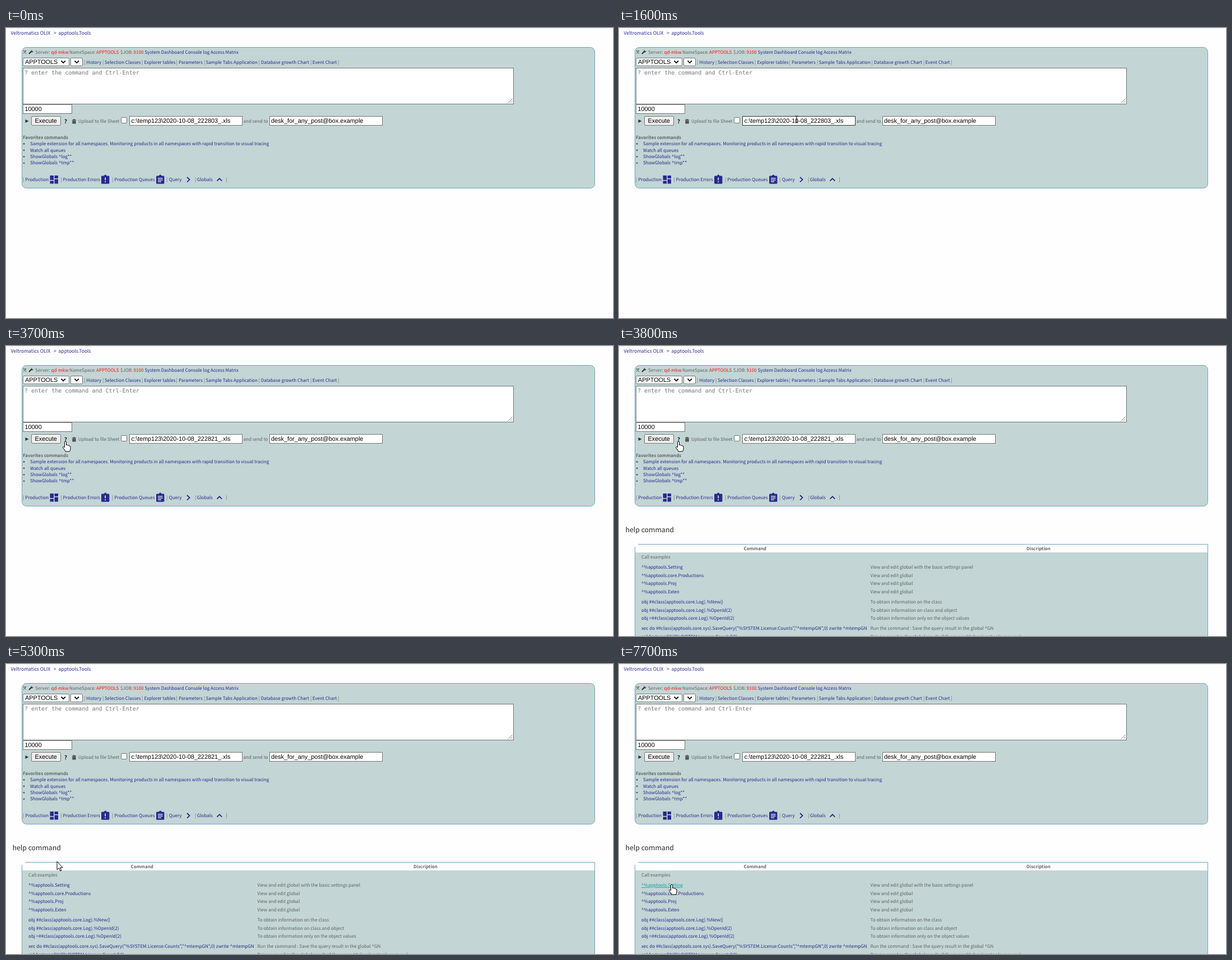
These frames come from a looping animation (1083x517 px, 8000 ms). An HTML page:

```html
<!DOCTYPE html>
<html lang="en">
<head>
<meta charset="utf-8">
<title>apptools.Tools</title>
<style>
html, body { margin: 0; height: 100%; overflow: hidden; background: #fefefe; }
svg { display: block; width: 1083px; height: 517px; }
text {
  font: 8.05px "Noto Sans CJK SC", "Noto Sans CJK JP", "Noto Sans CJK", "Open Sans", sans-serif;
  text-rendering: geometricPrecision; white-space: pre; fill: #606464;
}
.link { fill: #29298f; }
.red { fill: #f31414; }
.bold { font-size: 7.95px; font-weight: 700; }
.mid { text-anchor: middle; }
.crumb { font-size: 8.59px; fill: #29298f; }
.title { font-size: 12.3px; fill: #2a2a2a; }
.field { font: 10.87px "Liberation Sans", Arial, sans-serif; fill: #000; }
.mono { font: 10px "DejaVu Sans Mono", monospace; fill: #757575; }
.help { font-size: 9.6px; font-weight: 700; fill: #111; }
.panel { fill: #c3d5d4; stroke: #6ba5c4; }
.box { fill: #fff; stroke: #767676; }
.icon { fill: #29298f; }
.chevron { fill: none; stroke-width: 1.8; }
.hover { fill: #0f9f9f; text-decoration: underline; }
.box.over { stroke: #333; }
#pointer path { fill: #fff; stroke: #000; stroke-linejoin: round; }
</style>
</head>
<body>
<svg id="stage" viewBox="0 0 1083 517"></svg>
<script>
const escape = s => s.replace(/&/g, '&amp;').replace(/</g, '&lt;').replace(/>/g, '&gt;');
const text = (x, y, s, cls = '', id = '') =>
  `<text x="${x}" y="${y}" class="${cls}" id="${id}">${escape(s)}</text>`;
const box = (x, y, w, h, id = '', rx = 1.5) =>
  `<rect x="${x + .5}" y="${y + .5}" width="${w}" height="${h}" rx="${rx}" class="box" id="${id}"/>`;
const path = (d, cls = '', extra = '') => `<path d="${d}" class="${cls}" ${extra}/>`;
const row = (y, cls, items) => items.map(([x, s, c = cls]) => text(x, y, s, c)).join('');
const bars = (y, xs) => xs.map(x => text(x, y, '|')).join('');
const chevron = (d, color = '#111') => path(d, 'chevron', `stroke="${color}"`);

const header = text(8.5, 12, 'Veltromatics OLIX', 'crumb') + text(85, 12, '>', 'crumb') +
  text(93.5, 12, 'apptools.Tools', 'crumb') +
  path('M0 .5H1083', '', 'stroke="#f1f1f4"');

const toolbar =
  path('M31 40l5 6M36 40l-5 6M31 42l2-2M34 40l2 2', '', 'stroke="#555" fill="none"') +
  path('M41 46l4-4', '', 'stroke="#222" stroke-width="1.8"') +
  path('M47 39.5l-1.5 1.5 1 1 1.8-1.3q.3 2.8-2.5 2.5-2.2-.3-1.4-2.4.8-1.6 2.6-1.3', '', 'fill="#222"') +
  row(46, 'link', [[52, 'Server:', ''], [80.5, 'qd-mkw', 'red'], [113, 'NameSpace:', ''],
    [161, 'APPTOOLS', 'red'], [204, '$JOB:', ''], [227.5, '9100', 'red'],
    [247.5, 'System Dashboard'], [319.5, 'Console log'], [365, 'Access Matrix']]) +
  box(30, 53, 82, 14) + text(34, 64, 'APPTOOLS', 'field') + chevron('M98.5 58.5l3.7 3.7 3.7-3.7') +
  box(115, 53, 21, 14) + chevron('M122.5 58.5l3.7 3.7 3.7-3.7') +
  bars(64, [139, 172, 242, 303.5, 353, 450.5, 543, 592]) +
  row(64, 'link', [[143.2, 'History'], [176, 'Selection Classes'], [246.5, 'Explorer tables'],
    [308, 'Parameters'], [356.5, 'Sample Tabs Application'], [454.7, 'Database growth Chart'],
    [546.7, 'Event Chart']]);

const form =
  box(30, 71, 875, 64, 'command', 0) + text(33, 83, '? enter the command and Ctrl-Enter', 'mono') +
  path('M896 133.5l7.5-7.5M900 133.5l3.5-3.5', '', 'stroke="#777"') +
  box(30, 136, 87, 16, '', 0) + text(33.5, 148, '10000', 'field') +
  path('M34.5 163l6 3-6 3z', '', 'fill="#333"') +
  box(45, 157, 52, 16).replace('class', 'style="fill:#efefef" class') + text(51.5, 169, 'Execute', 'field') +
  text(104, 170, '?', 'help') +
  path('M117.8 164h7.4M120 163h3', '', 'stroke="#222"') +
  path('M118.5 165.3h6v5.2h-6z', '', 'fill="#333"') + path('M120.5 166v4M122.5 166v4', '', 'stroke="#aaa" stroke-width=".6"') +
  text(129, 169, 'Upload to file Sheet') + box(205, 159, 10, 10) +
  box(220, 157, 201, 16, 'file', 0) + text(223.5, 169, '', 'field', 'fileName') +
  text(423.5, 169, 'and send to') +
  box(470, 157, 201, 16, '', 0) + text(473, 169, 'desk_for_any_post@box.example', 'field');

const favorites = text(30, 198, 'Favorites commands', 'bold') +
  ['Sample extension for all namespaces. Monitoring products in all namespaces with rapid transition to visual tracing',
    'Watch all queues', 'ShowGlobals ^log**', 'ShowGlobals ^tmp**'].map((s, i) => {
    const y = 209.2 + i * 11.43;
    return `<circle cx="32" cy="${y - 2.7}" r="1.4" fill="#555"/>` + text(43, y, s, 'link');
  }).join('');

const links = bars(273, [30, 97.5, 189, 286, 337, 392.5]) +
  text(34.3, 273, 'Production', 'link', 'production') +
  row(273, 'link', [[101.5, 'Production Errors'], [193.3, 'Production Queues'],
    [290.7, 'Query'], [340.7, 'Globals']]) +
  path('M78.5 263h6.5v8h-6.5zM78.5 272.5h6.5v5h-6.5zM86.5 263h6.5v5h-6.5zM86.5 269.5h6.5v8h-6.5z', 'icon') +
  [177.2, 275.2].map(x => `<rect x="${x - 7.2}" y="263.5" width="14.4" height="14.3" rx="1.5" class="icon"/>
    <circle cx="${x}" cy="263.5" r="2" class="icon"/>`).join('') +
  path('M177.2 266.5v5M177.2 273.3v2', '', 'stroke="#dbe6e6" stroke-width="1.7"') +
  path('M271 268h8.5M271 271h8.5M271 274h6', '', 'stroke="#dbe6e6" stroke-width="1.4"') +
  chevron('M323 266l4.5 4.3-4.5 4.3', '#29298f') + chevron('M376.5 272.7l4.4-4.4 4.4 4.4', '#29298f');

const examples = [
  [379, 'Call examples', ''],
  [397, '^%apptools.Setting', 'View and edit global with the basic settings panel'],
  [411.6, '^%apptools.core.Productions', 'View and edit global'],
  [426.4, '^%apptools.Proj', 'View and edit global'],
  [441.2, '^%apptools.Exten', 'View and edit global'],
  [459, 'obj ##class(apptools.core.Log).%New()', 'To obtain information on the class'],
  [473.7, 'obj ##class(apptools.core.Log).%OpenId(2)', 'To obtain information on class and object'],
  [488.4, 'obj =##class(apptools.core.Log).%OpenId(2)', 'To obtain information only on the object values'],
  [506.3, 'xec do ##class(apptools.core.sys).SaveQuery("%SYSTEM.License:Counts","^mtempGN",0) zwrite ^mtempGN',
    'Run the command : Save the query result in the global ^GN'],
  [521, 'sql ^mtempGN("%SYSTEM.License:Counts",0)',
    'Bring a saved in the global result of the query ##class(apptools.core.sys)']];

const help = `<g id="help">` + text(11.5, 332, 'help command', 'title') +
  `<rect x="28.5" y="368" width="1022" height="160" fill="#c3d5d4"/>` +
  path('M28.5 517V358M34 353.5H1050.5V517', '', 'stroke="#6ba5c4" fill="none"') +
  text(242.7, 364, 'Command', 'bold mid') + text(748.5, 364, 'Discription', 'bold mid') +
  examples.map(([y, command, note], i) =>
    text(40, y, command, i ? 'link' : '', i === 1 ? 'setting' : '') + text(448.5, y, note)).join('') + '</g>';

const shapes = {
  arrow: 'M0 0V14.8L3.4 11.7L5.7 17L7.9 16L5.7 11H10.2Z',
  hand: 'M-1.5 11V1.2Q-1.5 0 0 0T1.5 1.2V6.5Q4 5.8 4.4 7.3Q6.5 6.5 7 8.2Q9 7.8 9 10V13Q9 15.5 7.5 18H0Q-1 15-4.5 11.5Q-5 9.5-3 9.5Z',
  beam: 'M-2.5-6H-.5L0-5.5L.5-6H2.5M0-5.5V5.5M-2.5 6H-.5L0 5.5L.5 6H2.5'
};

document.getElementById('stage').innerHTML = header +
  '<rect x="28.5" y="34.5" width="1022" height="251" rx="8" class="panel"/>' +
  toolbar + form + favorites + links + help + '<g id="pointer"><path/></g>';

// Pointer track: time, x, y
const track = [[300, 1072, 34], [500, 930, 62], [800, 690, 102], [1100, 532, 125], [1300, 430, 146],
  [1600, 317, 163], [2000, 157, 165], [2200, 134, 168], [2500, 107, 173], [2700, 106, 171],
  [3000, 106, 170], [4400, 106, 170], [4600, 103, 188], [4800, 97, 252], [4900, 93, 268],
  [5100, 91, 285], [5300, 91, 352], [5500, 92, 372], [5900, 94, 394], [7600, 94, 394], [7700, 94, 393]];

function position(t) {
  const i = track.findIndex(k => k[0] > t);
  if (i < 0) return track[track.length - 1].slice(1);
  if (!i) return [-50, -50];
  const [t0, x0, y0] = track[i - 1], [t1, x1, y1] = track[i];
  const f = (t - t0) / (t1 - t0);
  return [x0 + (x1 - x0) * f, y0 + (y1 - y0) * f].map(Math.round);
}

const $ = id => document.getElementById(id);
const pointer = $('pointer');

function draw(now) {
  const t = Math.floor(now % 8000 / 100) * 100;
  const held = t > 5900 && t < 7700 ? 5900 : t;
  const [x, y] = position(held);
  const inside = (l, top, r, b) => x >= l && x <= r && y >= top && y <= b;
  const over = {
    command: inside(30, 71, 906, 135),
    file: inside(220, 157, 421, 174),
    production: inside(34, 263, 94, 278),
    setting: inside(40, 389, 114, 399)
  };
  $('command').classList.toggle('over', over.command);
  $('file').classList.toggle('over', over.file);
  $('production').classList.toggle('hover', over.production);
  $('setting').classList.toggle('hover', over.setting);

  const shape = over.command || over.file || inside(129, 160, 200, 171) ? 'beam'
    : over.production || over.setting || inside(103, 160, 110, 172) ? 'hand' : 'arrow';
  pointer.setAttribute('transform', `translate(${x} ${y})`);
  pointer.firstChild.setAttribute('d', shapes[shape]);
  pointer.firstChild.style.fill = shape === 'beam' ? 'none' : '#fff';
  $('fileName').textContent = `c:\\temp123\\2020-10-08_${t < 3700 ? 222803 : 222821}_.xls`;
  $('help').style.display = t < 3800 ? 'none' : '';
}

const start = performance.now();
function tick() {
  draw(performance.now() - start);
  requestAnimationFrame(tick);
}
tick();
</script>
</body>
</html>
```
